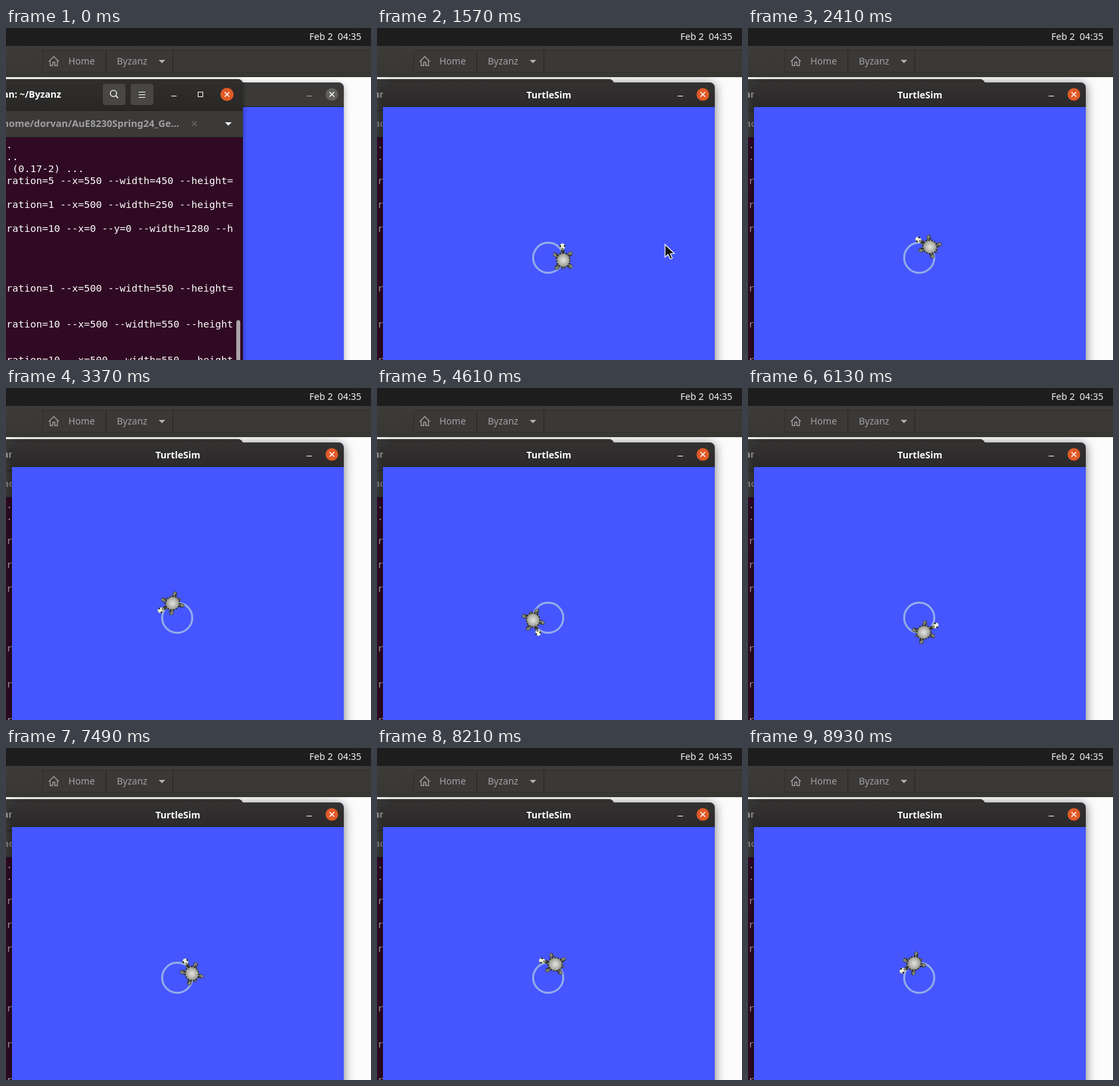
Write an HTML page with a canvas that moves like this. It is 550 px wide and 500 px high and loops after 9030 ms.

```html
<!DOCTYPE html>
<html lang="en">
<head>
<meta charset="utf-8">
<title>Turtle circling</title>
<style>
html, body { margin: 0; width: 100%; height: 100%; overflow: hidden; background: #fdfcfd; }
canvas { display: block; }
</style>
</head>
<body>
<canvas id="stage" width="550" height="500"></canvas>
<script>
const c = document.getElementById('stage').getContext('2d');
const LOOP = 9030, STEP = 40, SHOW_POINTER = 740, CLICK = 1570;
const SANS = '"Noto Sans", "Open Sans", sans-serif';
const UI = '14px ' + SANS, BOLD = 'bold 14px ' + SANS, TAB = '600 14.5px ' + SANS;
const MONO = '14.95px "DejaVu Sans Mono", monospace';
const BLUE = '#4556ff', ORANGE = '#e05a26';
const LINES = [
  [181, '.'], [199, '..'], [217, ' (0.17-2) ...'],
  [235, 'ration=5 --x=550 --width=450 --height='],
  [271, 'ration=1 --x=500 --width=250 --height='],
  [307, 'ration=10 --x=0 --y=0 --width=1280 --h'],
  [397, 'ration=1 --x=500 --width=550 --height='],
  [451, 'ration=10 --x=500 --width=550 --height'],
  [505, 'ration=10 --x=500 --width=550 --height']
];

function rect(x, y, w, h, color) {
  c.fillStyle = color;
  c.fillRect(x, y, w, h);
}
function text(s, x, y, font, color, align = 'left') {
  c.font = font;
  c.fillStyle = color;
  c.textAlign = align;
  c.fillText(s, x, y);
}
function line(color, width, ...p) {
  c.beginPath();
  for (let i = 0; i < p.length; i += 2) c.lineTo(p[i], p[i + 1]);
  c.strokeStyle = color;
  c.lineWidth = width;
  c.stroke();
}
function poly(color, ...p) {
  c.beginPath();
  for (let i = 0; i < p.length; i += 2) c.lineTo(p[i], p[i + 1]);
  c.closePath();
  c.fillStyle = color;
  c.fill();
}
function round(x, y, w, h, r, color) {
  c.beginPath();
  c.roundRect(x, y, w, h, r);
  c.fillStyle = color;
  c.fill();
}
function oval(x, y, rx, ry, color, angle = 0) {
  c.beginPath();
  c.ellipse(x, y, rx, ry, angle, 0, 7);
  c.fillStyle = color;
  c.fill();
}
function cross(x, y, r, color, width) {
  line(color, width, x - r, y - r, x + r, y + r);
  line(color, width, x - r, y + r, x + r, y - r);
}
function shade(top, bottom, y0, y1) {
  const g = c.createLinearGradient(0, y0, 0, y1);
  g.addColorStop(0, top);
  g.addColorStop(1, bottom);
  return g;
}
function frame(x, y, w, h, color, blur, alpha) {
  c.save();
  c.shadowColor = `rgba(0,0,0,${alpha})`;
  c.shadowBlur = blur;
  c.shadowOffsetY = 2;
  round(x, y, w, h, [8, 8, 0, 0], color);
  c.restore();
}

function desktop() {
  rect(0, 0, 550, 500, '#fdfcfd');
  rect(0, 0, 550, 27, '#1d1d1d');
  text('Feb 2  04:35', 457, 18, UI, '#f2f2f2');
  rect(0, 27, 550, 47, shade('#3d3c39', '#373633', 27, 74));
  rect(55, 33, 495, 34, '#302f2d');
  rect(56, 34, 494, 32, '#3a3936');
  rect(150, 34, 1, 32, '#262524');
  rect(251, 33, 1, 34, '#262524');
  line('#a5a2a6', 1.3, 64.5, 50.5, 72, 43, 79.5, 50.5);
  line('#a5a2a6', 1.3, 66.5, 49, 66.5, 56.5, 70.5, 56.5, 70.5, 51.5,
    73.5, 51.5, 73.5, 56.5, 77.5, 56.5, 77.5, 49);
  text('Home', 94, 55, UI, '#a3a0a8');
  text('Byzanz', 167, 55, UI, '#a3a0a8');
  poly('#b3b1b4', 230, 48, 240, 48, 235, 53);
}

function terminal(active) {
  const ink = active ? '#ffffff' : '#a8a5ad';
  frame(-20, 77, 377, 440, '#300a24', active ? 7 : 5, active ? .4 : .25);
  round(-20, 77, 377, 47, [8, 8, 0, 0], active ? shade('#302f2d', '#282726', 77, 124) : '#3a3937');
  rect(0, 124, 357, 41, '#222120');
  rect(0, 125, 357, 39, '#3b3a38');
  text('an: ~/Byzanz', 83, 105, BOLD, ink, 'right');
  text('/home/dorvan/AuE8230Spring24_Ge…', 261, 149, TAB, active ? '#a09e9f' : '#85828a', 'right');
  cross(284, 144, 3.5, '#6b6967', 1.2);
  poly(ink, 330, 142, 340, 142, 335, 147);

  round(146, 84, 34, 32, 4, '#484745');
  round(188, 84, 34, 32, 4, '#484745');
  c.beginPath();
  c.arc(162, 98.5, 4.7, 0, 7);
  c.strokeStyle = ink;
  c.lineWidth = 1.3;
  c.stroke();
  line(ink, 1.5, 165.5, 102, 169, 105.5);
  for (let y = 96; y < 106; y += 4) rect(200, y, 10, 1, ink);
  rect(249, 102, 8, 1, ink);
  c.strokeStyle = ink;
  c.lineWidth = 1;
  c.strokeRect(289.5, 96.5, 7, 7);
  oval(333, 100, 10, 10, ORANGE);
  cross(333, 100, 3.5, '#ffffff', 1.4);

  for (const [y, s] of LINES) text(s, 0.5, y, MONO, ink);
  round(347, 440, 6, 70, 3, '#aaa3a8');
}

function turtle(x, y, angle) {
  c.save();
  c.translate(x, y);
  c.rotate(-angle);
  for (const deg of [52, -52, 135, -135]) {
    c.save();
    c.rotate(-deg * Math.PI / 180);
    oval(13.5, 0, 4.6, 3.2, '#34362f');
    oval(14.2, -.3, 3.4, 2.1, '#85887c');
    rect(12, 0, 1.5, 1.5, '#20221d');
    c.restore();
  }
  poly('#50534a', -10, -2, -15.5, -2, -10, 2);
  oval(14, 0, 3.5, 2.8, '#3c3f37');
  oval(20.5, 0, 5, 4.2, '#b4bba8');
  oval(21, .5, 3.8, 3, '#eef2df');
  rect(20, -4, 2.5, 2, '#10130d');
  rect(20, 2.5, 2.5, 2, '#10130d');
  rect(17, -1, 1.5, 2, '#2b2e26');

  const g = c.createRadialGradient(0, 0, 1, 0, 0, 11);
  g.addColorStop(0, '#dedfd9');
  g.addColorStop(.65, '#aaaba5');
  g.addColorStop(1, '#74766f');
  oval(0, 0, 11.5, 10.5, g);
  for (let i = 0; i < 8; i++) {
    const a = i * Math.PI / 4 + .3;
    line('#d0d1cb88', .8, 4 * Math.cos(a), 4 * Math.sin(a), 9 * Math.cos(a), 9 * Math.sin(a));
  }
  c.beginPath();
  c.ellipse(0, 0, 11, 10, 0, 0, 7);
  c.setLineDash([2.3, 2]);
  c.strokeStyle = '#262820';
  c.lineWidth = 1.8;
  c.stroke();
  c.restore();
}

function simulator(t, active) {
  const ink = active ? '#ffffff' : '#a6a4a5';
  frame(9, 82, 500, 430, BLUE, active ? 16 : 10, active ? .55 : .35);
  round(9, 82, 500, 37, [8, 8, 0, 0], active ? shade('#343231', '#2b2929', 82, 119) : '#3b3a38');
  rect(9, 118, 500, 1, '#232221');
  text('TurtleSim', 259, 106, BOLD, ink, 'center');
  rect(453, 102, 8, 1, ink);
  oval(491, 100, 9.5, 9.5, active ? ORANGE : '#62605f');
  cross(491, 100, 3.6, '#ffffff', 1.4);
  rect(9, 119, 500, 381, BLUE);

  c.beginPath();
  c.arc(258, 346, 22.7, 0, 7);
  c.strokeStyle = '#94abe8';
  c.lineWidth = 3;
  c.stroke();
  const a = (45.5 + 65 * (t - 2410) / 1000) * Math.PI / 180;
  turtle(258 + 23 * Math.cos(a), 346 - 23 * Math.sin(a), a + 1.8);
}

const ease = p => (p = Math.min(1, Math.max(0, p)), p * p * (3 - 2 * p));

function pointer(t) {
  if (t < SHOW_POINTER) return;
  const p = ease((t - SHOW_POINTER) / 600);
  const x = 205 + 229 * p, y = 249 + 77 * p + 180 * ease((t - 1650) / 500);
  if (x < 357) {
    for (const [color, w] of [['#ffffff', 3], ['#000000', 1]]) {
      line(color, w, x - 3, y - 8, x + 3, y - 8);
      line(color, w, x, y - 8, x, y + 8);
      line(color, w, x - 3, y + 8, x + 3, y + 8);
    }
    return;
  }
  c.save();
  c.translate(x, y);
  poly('#111111', 0, 0, 0, 19, 4.5, 15, 8, 22, 11, 20.5, 8, 14, 14, 13.5);
  c.strokeStyle = '#ffffff';
  c.lineWidth = 1.2;
  c.stroke();
  c.restore();
}

function draw(now) {
  const time = now % LOOP;
  const t = CLICK + Math.floor((time - CLICK) / STEP) * STEP;
  const raised = time >= CLICK;
  desktop();
  c.save();
  c.beginPath();
  c.rect(0, 74, 550, 426);
  c.clip();
  if (raised) terminal(false);
  simulator(t, raised);
  if (!raised) terminal(true);
  pointer(time < CLICK ? time : t);
  c.restore();
}

const start = performance.now();
function tick() {
  draw(performance.now() - start);
  requestAnimationFrame(tick);
}
tick();
</script>
</body>
</html>
```
